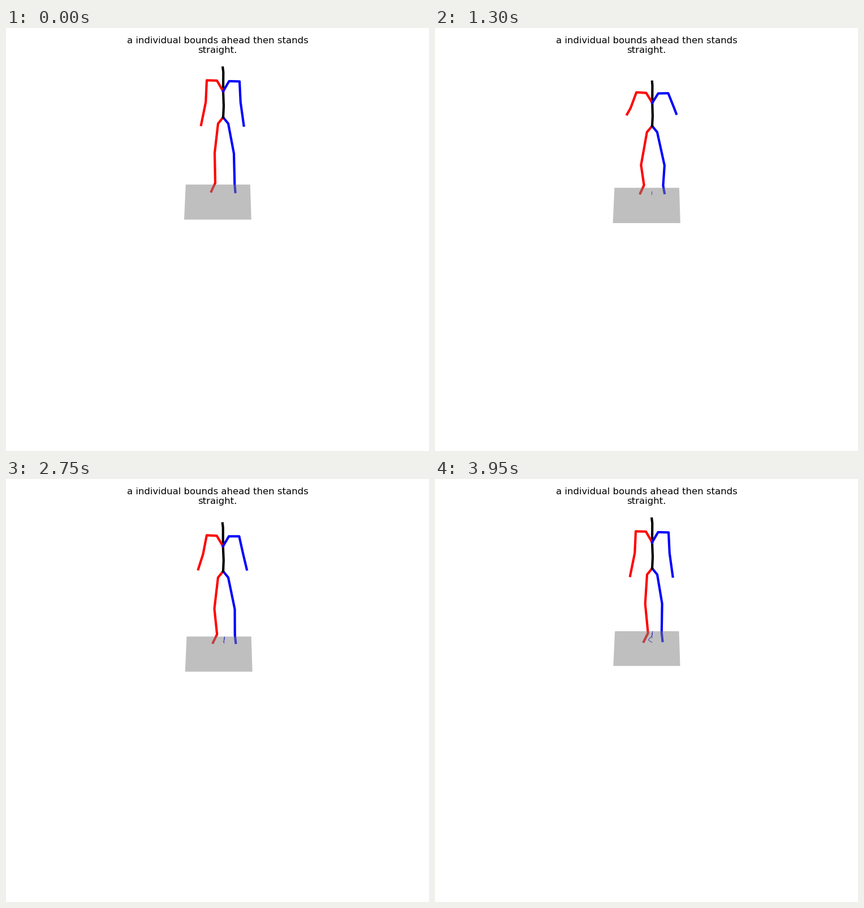
A matplotlib script for the animation above (4 s loop, 748x748 px).

```python
import numpy as np
import matplotlib.pyplot as plt
from matplotlib.animation import FuncAnimation
from matplotlib.patches import Polygon

SIZE, DPI = 748, 100
FRAMES, STEP = 80, 50
GROUND = np.array([383.7, 288.8])
ROOT_Y = 158

# Joints from the body outwards, in the two extreme poses
STAND = {
    "root": [(384, 158)],
    "right leg": [(375, 169), (369, 221), (370, 274), (363, 289)],
    "left leg": [(393, 169), (403, 222), (404.3, 276), (405.5, 290)],
    "spine": [(385, 138), (384, 112), (384.3, 78), (383.3, 70)],
    "right arm": [(373, 93), (355, 92.5), (351, 131), (340.5, 171.5)],
    "left arm": [(394.5, 94), (413, 94.5), (417, 131), (425, 172.5)],
}
CROUCH = {
    "root": [(384, 231)],
    "right leg": [(374, 241), (357.5, 268), (368, 289), (362.5, 305)],
    "left leg": [(392.5, 241), (406, 267), (400, 284), (407, 299)],
    "spine": [(384.5, 222), (385, 209), (385, 190), (386, 188.5)],
    "right arm": [(375, 196.5), (360.5, 202), (347.5, 230), (344.2, 246.5)],
    "left arm": [(395.5, 197), (410, 202), (422, 225), (424.7, 237.5)],
}
# Extra bend between the extremes, x pointing away from the body
FLEX = {
    "leg": [(0, 0), (2.5, 13), (0, 1), (0, 0)],
    "arm": [(0, 0), (0, -2), (5, -11.5), (2, -39)],
}
SIDES = {"right": -1, "left": 1}
ARM_SWING = np.array([0, 0, .5, 1])
LEG_SLIDE = np.array([0, .4, 1, .9])


def ease(t, start, end):
    u = np.clip((t - start) / (end - start), 0, 1)
    return np.sin(np.pi * u / 2) ** 2


def bell(t, peak, width):
    return np.exp(-((t - peak) / width) ** 2)


def crouch_amount(t):
    """Eased dip, then a softer rise."""
    return 1.02 * (ease(t, 1030, 1930) if t < 1930 else bell(t, 1930, 503))


def floor_drift(t):
    """Floor offset in pixels as the body travels over it."""
    dx = 6 * bell(t, 3020, 250) - crouch_amount(t)
    dy = 11.5 * ease(t, 650, 1950) - 19.1 * ease(t, 1960, 3520)
    return dx, dy


def pose(t):
    c = crouch_amount(t)
    flex = 6.75 * c * (1 - c) ** 2
    lean = bell(t, 3200, 350)
    relax = 1 - ease(t, 0, 600) + ease(t, 3250, 3950)
    land, settle = ease(t, 2300, 3200), ease(t, 3250, 3950)
    slide = {"right": (6.7 * land, -1.5 * land),
             "left": (1.5 * land - 5 * settle, -2 * land - 2 * settle)}
    body = {}
    for part, points in STAND.items():
        stand = np.array(points, float)
        p = stand + c * (np.array(CROUCH[part]) - stand)
        p[:, 0] -= .037 * lean * np.maximum(0, ROOT_Y - stand[:, 1])
        side, _, limb = part.partition(" ")
        if limb:
            p += flex * np.array(FLEX[limb]) * (SIDES[side], 1)
        if limb == "arm":
            p += np.outer(ARM_SWING, (-4.5 * relax * SIDES[side], -5.5 * lean))
        elif limb == "leg":
            p += np.outer(LEG_SLIDE, slide[side])
        body[part] = p
    return body


def floor_corners(dx, dy):
    top, bottom = 276.8 + dy, 338.8 + 1.08 * dy
    grow = .04 * dy
    return [(317.8 + dx - grow, top), (431.8 + dx + grow, top),
            (433.8 + dx + grow, bottom), (315 + dx - grow, bottom)]


drift = np.array([floor_drift(n * STEP) for n in range(FRAMES)])

fig = plt.figure(figsize=(SIZE / DPI, SIZE / DPI), dpi=DPI, facecolor="white")
ax = fig.add_axes([0, 0, 1, 1])
ax.set_xlim(0, SIZE)
ax.set_ylim(SIZE, 0)
ax.axis("off")
fig.suptitle("a individual bounds ahead then stands\nstraight.",
             fontsize=11.87, fontfamily="DejaVu Sans")

COLORS = {"right leg": "red", "left leg": "blue", "spine": "black",
          "right arm": "red", "left arm": "blue"}
trail, = ax.plot([], [], color="blue", lw=.72, zorder=1)
limbs = {part: ax.plot([], [], color=color, lw=3, zorder=2)[0]
         for part, color in COLORS.items()}
floor = Polygon(np.zeros((4, 2)), facecolor=(.5, .5, .5, .5),
                edgecolor="none", zorder=3)
ax.add_patch(floor)


def update(n):
    body = pose(n * STEP)
    chest = body["spine"][1:2]
    for part, line in limbs.items():
        start = chest if part.endswith("arm") else body["root"]
        line.set_data(*np.vstack([start, body[part]]).T)
    trail.set_data(*(GROUND + drift[n] - drift[:n]).T)
    floor.set_xy(floor_corners(*drift[n]))
    return [trail, *limbs.values(), floor]


anim = FuncAnimation(fig, update, frames=FRAMES, interval=STEP, repeat=True)
plt.show()
```
